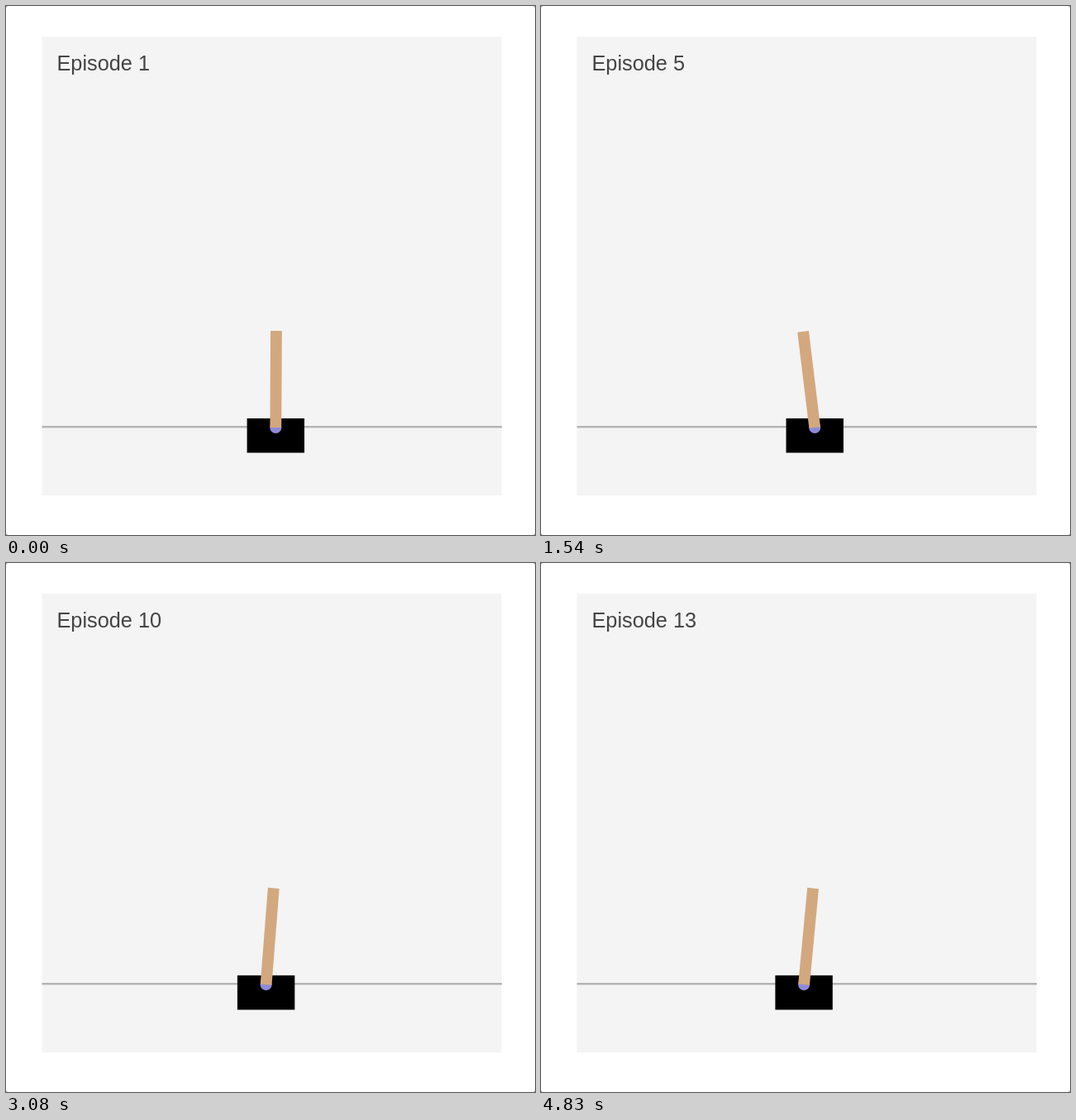
Animation, 640 px wide and 640 px high, one loop 4900 ms. Source, as an HTML page:

```html
<!DOCTYPE html>
<html lang="en">
<head>
<meta charset="utf-8">
<title>Cart and pole</title>
<style>
  html, body { margin: 0; width: 100%; height: 100%; overflow: hidden; background: #999; }
  svg { display: block; width: 100vw; height: 100vh; }
  text { font: 25.3px "Liberation Sans", Arial, sans-serif; fill: #444; }
</style>
</head>
<body>
<svg viewBox="0 0 640 640">
  <rect width="640" height="640" rx="3" fill="#fff"/>
  <rect x="43.5" y="37" width="556" height="555.2" fill="#f4f4f4"/>
  <text id="label" x="61.5" y="78.3">Episode 1</text>
  <rect x="43.5" y="508" width="556.5" height="2.4" fill="#b3b3b3"/>
  <g id="cart">
    <rect x="-34.7" y="498.9" width="69.4" height="41.6"/>
    <circle cy="510" r="7" fill="#8f8ad8"/>
    <rect id="pole" x="-6.9" y="393" width="13.8" height="117" fill="#d3a87f"/>
  </g>
</svg>
<script>
const STEP = 70, STEPS = 70;
const FALL = 11;       // degrees at which an episode ends
const LEFT = [1, 5, 9, 11];  // episodes whose pole falls to the left

// First step of each episode; the loop cuts the last one short.
const starts = [0, 6, 9, 14, 18, 24, 28, 31, 35, 42, 47, 60, 64, 72.5];

const [label, cart, pole] = ["label", "cart", "pole"].map(id => document.getElementById(id));
const mix = (a, b, k) => a + (b - a) * k;

// The pole falls ever faster while the cart runs the opposite way.
function pose(episode, step) {
  const first = starts[episode - 1];
  const length = starts[episode] - first;
  const u = (step - first) / (length - 1);
  const left = LEFT.includes(episode);
  const travel = 4 + length ** 3 / 58;
  const tilt = left ? length / 6 - 0.7 : 2.3;
  return {
    x: left ? 326.3 + travel * u * u : 310 + travel * (1 - u * u),
    angle: mix(tilt, left ? -FALL : FALL, u ** Math.max(2, 0.3 * length))
  };
}

function draw(time) {
  const step = Math.floor(time / STEP) % STEPS;
  const episode = starts.filter(s => s <= step).length;
  const { x, angle } = pose(episode, step);
  label.textContent = `Episode ${episode}`;
  cart.setAttribute("transform", `translate(${x} 0)`);
  pole.setAttribute("transform", `rotate(${angle} 0 510)`);
}

const begin = performance.now();
function tick() {
  draw(performance.now() - begin);
  requestAnimationFrame(tick);
}
tick();
</script>
</body>
</html>
```
